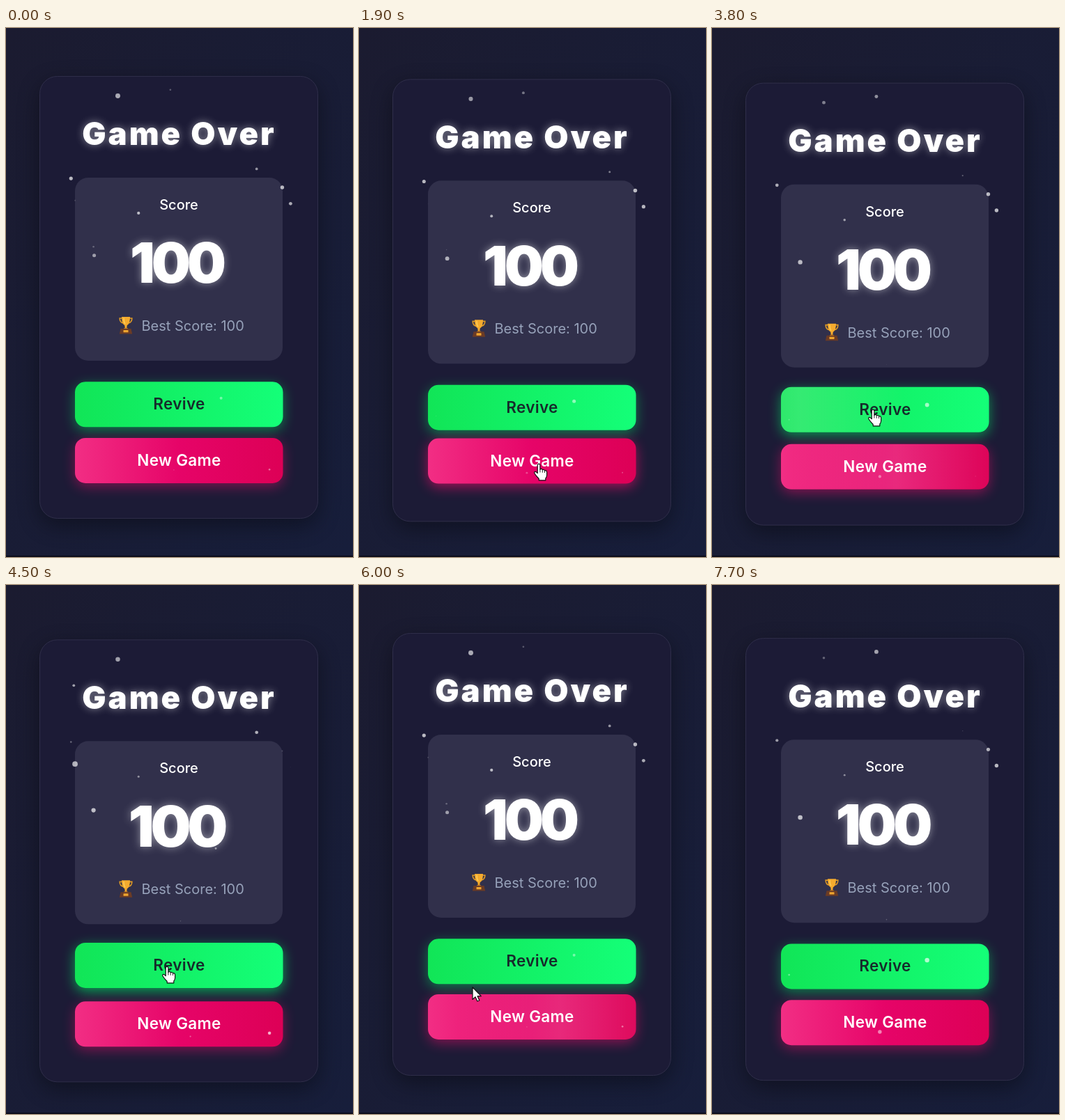
An HTML page for the animation above (7800 ms loop, 498 by 760 pixels).

```html
<!DOCTYPE html>
<html lang="en">
<head>
<meta charset="utf-8">
<title>Game Over</title>
<style>
  html, body { margin: 0; width: 100%; height: 100%; overflow: hidden; background: #1a1b31; }
  svg { display: block; width: 498px; height: 760px; }
  text { font-family: Inter, "Open Sans", sans-serif; fill: #fff; }
  .mid { text-anchor: middle; }
  .title { font-size: 45.5px; font-weight: 900; letter-spacing: 3px; }
  .points { font-size: 79px; font-weight: 900; letter-spacing: -5px; }
  .title, .points { filter: drop-shadow(0 0 6px rgba(255, 255, 255, .45)); }
  .label { font-size: 20px; font-weight: 500; }
  .best { font-size: 20px; fill: #97a2ba; }
  .action { font-size: 22.5px; font-weight: 600; letter-spacing: .3px; }
  .glow { filter: blur(9px); }
  .cursor path { fill: #fff; stroke: #111; stroke-width: 1.2; stroke-linejoin: round; }
</style>
</head>
<body>
<svg viewBox="0 0 498 760">
  <defs>
    <linearGradient id="night" x1="0" y1="0" x2="1" y2="1">
      <stop offset="0" stop-color="#1b1b30"/>
      <stop offset="1" stop-color="#171e3b"/>
    </linearGradient>
    <linearGradient id="green">
      <stop offset="0" stop-color="#11e557"/>
      <stop offset="1" stop-color="#14ff78"/>
    </linearGradient>
    <linearGradient id="pink">
      <stop offset="0" stop-color="#f22e84"/>
      <stop offset=".5" stop-color="#e60468"/>
      <stop offset="1" stop-color="#dd0056"/>
    </linearGradient>
    <linearGradient id="sheen">
      <stop offset="0" stop-color="#fff" stop-opacity="0"/>
      <stop offset=".5" stop-color="#fff" stop-opacity=".15"/>
      <stop offset="1" stop-color="#fff" stop-opacity="0"/>
    </linearGradient>
    <clipPath id="face"><rect width="298.5" height="65" rx="15"/></clipPath>
  </defs>

  <rect width="498" height="760" fill="url(#night)"/>
  <rect y="758" width="498" height="2" fill="#0c0d1b"/>

  <g id="card">
    <rect x="48" y="10" width="400" height="636" rx="25" fill="#000" opacity=".38" style="filter: blur(16px)"/>
    <rect x="48.5" y=".5" width="399" height="635" rx="25" fill="#1c1b36" stroke="#2f2e4a"/>
    <text class="mid title" x="248.5" y="99.5">Game Over</text>

    <rect x="99" y="146" width="298" height="263" rx="19" fill="#31304b"/>
    <text class="mid label" x="248" y="192">Score</text>
    <g id="points"><text class="mid points" x="244.5" y="297">100</text></g>

    <g transform="translate(162 345)">
      <path d="M5 3H1.2q0 6 5.3 7M15 3h3.8q0 6-5.3 7" fill="none" stroke="#e09a25" stroke-width="1.6"/>
      <path d="M4 1h12q0 10-4.2 12l-.6 4H8.8l-.6-4Q4 11 4 1Z" fill="#f5ab2e"/>
      <path d="M7 2.5q0 6 2 8.5" fill="none" stroke="#ffd05c" stroke-width="1.4"/>
      <path d="M6 18.5q4-4 8 0Z" fill="#c97f1f"/>
      <path d="M2.500 18h15l1.700 7.500H.8Z" fill="#6b3b25"/>
      <rect x="6.5" y="20" width="7" height="3.4" rx=".6" fill="#eea52f"/>
    </g>
    <text class="best" x="194.5" y="366">Best Score: 100</text>

    <g id="revive">
      <rect class="glow" y="5" width="298.5" height="65" rx="15" fill="#00ff6a"/>
      <rect width="298.5" height="65" rx="15" fill="url(#green)"/>
      <g clip-path="url(#face)"><rect class="sheen" width="298.5" height="65" fill="url(#sheen)"/></g>
      <text class="mid action" x="149.5" y="40" style="fill: #162a2b">Revive</text>
    </g>
    <g id="newGame">
      <rect class="glow" y="5" width="298.5" height="65" rx="15" fill="#ff0a70"/>
      <rect width="298.5" height="65" rx="15" fill="url(#pink)"/>
      <g clip-path="url(#face)"><rect class="sheen" width="298.5" height="65" fill="url(#sheen)"/></g>
      <text class="mid action" x="149.5" y="40">New Game</text>
    </g>
    <g id="sparks" fill="#fff"></g>
  </g>

  <g id="arrow" class="cursor">
    <path d="M0 0V17.500L4 13.800 6.800 20 9.800 18.700 7.100 12.700H12.300Z"/>
  </g>
  <g id="hand" class="cursor">
    <path d="M-1.800 1.800Q0-1.600 1.900 1.800V8.200Q3.800 6.400 5.300 8.800 7.200 7.600 8.500 9.800 11.400 9 11.600 12.200V16.500Q11.400 19.500 9.800 21V23.800H.2V21.500Q-3.500 18-6.300 13.500-6.500 10.600-3.700 11.800L-1.800 13.700Z"/>
    <path d="M1.900 8V12.500M5.300 9V12.800M8.500 10V13" style="fill: none; stroke-width: .9"/>
  </g>
</svg>

<script>
  const LOOP = 7800, STEP = 100, SPARKS = 18, BUTTON_WIDTH = 298.5;
  const byId = id => document.getElementById(id);
  const move = (node, x, y) => node.setAttribute('transform', `translate(${x} ${y})`);
  const clamp = v => Math.max(0, Math.min(1, v));
  const mix = (a, b, k) => a + (b - a) * k;

  function bezier(x1, y1, x2, y2) {
    const curve = (a, b, u) => 3 * (1 - u) ** 2 * u * a + 3 * (1 - u) * u * u * b + u ** 3;
    return x => {
      let low = 0, high = 1;
      for (let i = 0; i < 14; i++) {
        const u = (low + high) / 2;
        if (curve(x1, x2, u) < x) low = u; else high = u;
      }
      return x <= 0 ? 0 : x >= 1 ? 1 : curve(y1, y2, low);
    };
  }
  const ease = bezier(.25, .1, .25, 1);
  const easeInOut = bezier(.42, 0, .58, 1);

  // 1 at the peak, 0 half a period away from it
  function wave(t, period, peak) {
    const d = (((t - peak) % period) + period) % period;
    return easeInOut(1 - Math.min(d, period - d) / (period / 2));
  }

  function seeded(seed) {
    return () => (seed = (seed * 16807) % 2147483647) / 2147483647;
  }

  const random = seeded(2024);
  const sparks = Array.from({ length: SPARKS }, (_, i) => {
    const dot = document.createElementNS('http://www.w3.org/2000/svg', 'circle');
    dot.setAttribute('cx', mix(88, 420, random()));
    dot.setAttribute('cy', mix(16, 580, random()));
    byId('sparks').append(dot);
    return { dot, radius: mix(1.8, 4.1, random()), peak: i * 2000 / SPARKS };
  });

  const buttons = [
    { node: byId('revive'), y: 439.3, hovers: [[3700, 4600]] },
    { node: byId('newGame'), y: 520, hovers: [[1120, 3660], [5500, 5870]] }
  ];

  // the pointer rests at each stop, then glides to the next by its arrival time
  const GLIDE = 300;
  const stops = [
    { at: 1100, x: 258, y: 626 },
    { at: 2400, x: 229, y: 611 },
    { at: 3800, x: 231, y: 548 },
    { at: 4900, x: 160, y: 331 },
    { at: 5600, x: 170, y: 605 },
    { at: 6000, x: 163, y: 578 },
    { at: 7500, x: 200, y: 2 }
  ];
  const shownFrom = stops[0].at, shownTo = stops.at(-1).at;

  function cursorAt(t) {
    const i = Math.max(1, stops.findIndex(stop => stop.at >= t));
    const from = stops[i - 1], to = stops[i];
    const k = easeInOut(1 - (to.at - t) / GLIDE);
    return [mix(from.x, to.x, k), mix(from.y, to.y, k)];
  }

  function hoverAmount(t, hovers, duration) {
    return Math.max(...hovers.map(([from, to]) =>
      clamp(ease((t - from) / duration) - ease((t - to) / duration))));
  }

  function draw(t) {
    move(byId('card'), 0, 67.4 + 12.5 * wave(t, 3000, 1130));

    const scale = 1 + .05 * wave(t, 2000, 900);
    byId('points').setAttribute('transform',
      `translate(247.5 268.5) scale(${scale}) translate(-247.5 -268.5)`);

    for (const { dot, radius, peak } of sparks) {
      const k = wave(t, 2000, peak);
      dot.setAttribute('r', radius * k);
      dot.setAttribute('opacity', .7 * k);
    }

    for (const { node, y, hovers } of buttons) {
      const lift = hoverAmount(t, hovers, 300);
      const sweep = hoverAmount(t, hovers, 500);
      move(node, 99, y - 3.75 * lift);
      node.querySelector('.glow').setAttribute('opacity', .42 + .16 * lift);
      move(node.querySelector('.sheen'), BUTTON_WIDTH * (2 * sweep - 1), 0);
    }

    const shown = t >= shownFrom && t <= shownTo;
    const pointing = buttons.some(b => b.hovers.some(([from, to]) => t >= from && t < to));
    byId('hand').style.display = shown && pointing ? '' : 'none';
    byId('arrow').style.display = shown && !pointing ? '' : 'none';
    if (shown) move(byId(pointing ? 'hand' : 'arrow'), ...cursorAt(t));
  }

  const start = performance.now();
  function tick() {
    const t = (performance.now() - start) % LOOP;
    draw(Math.floor(t / STEP) * STEP);
    requestAnimationFrame(tick);
  }
  tick();
</script>
</body>
</html>
```
